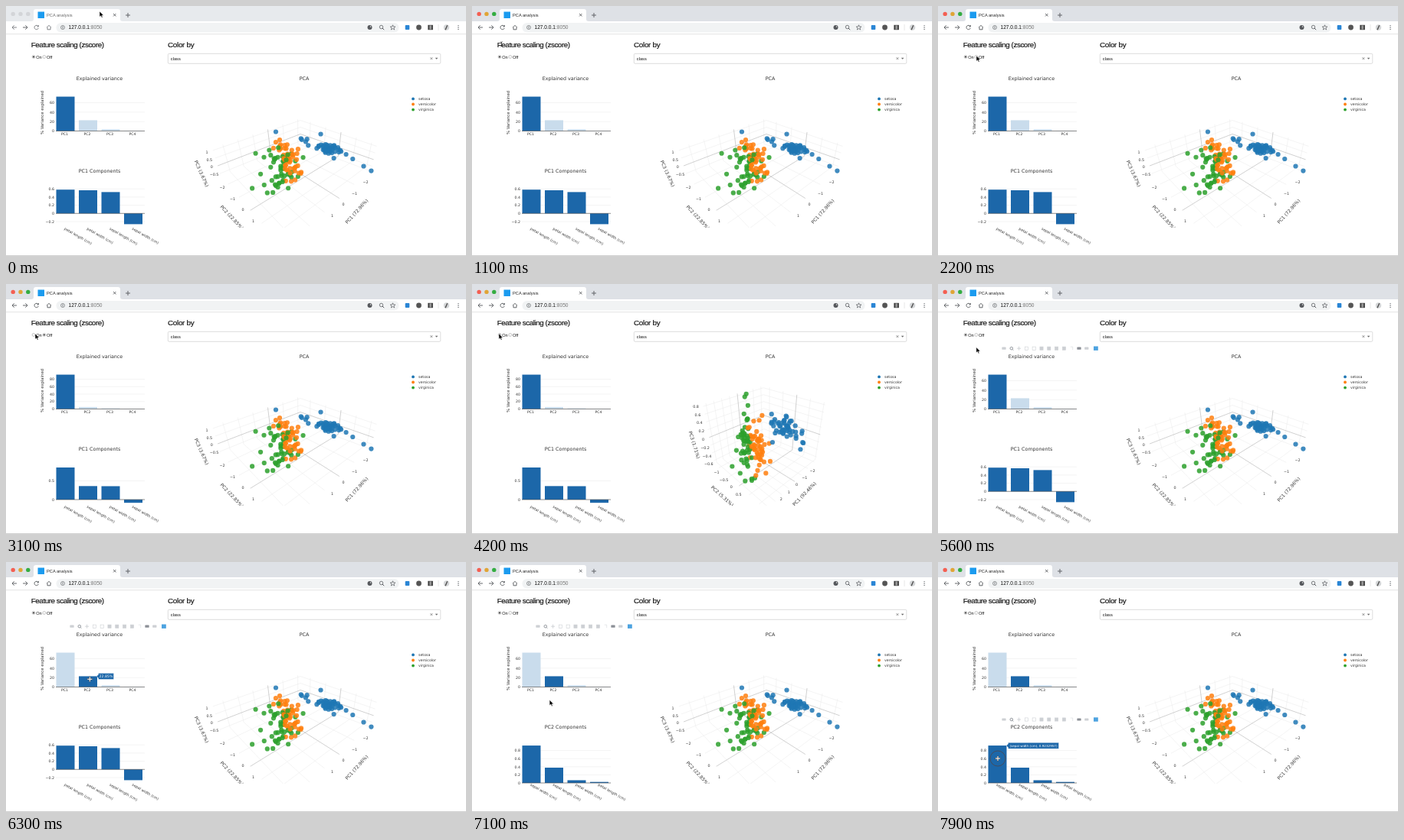
Animation, 600 px wide and 327 px high, one loop 8 s. Source, as an HTML page:

```html
<!DOCTYPE html>
<html lang="en">
<head>
<meta charset="utf-8">
<title>PCA analysis</title>
<style>
html, body { margin: 0; width: 100%; height: 100%; overflow: hidden; background: #fff; }
svg { display: block; width: 600px; height: 327px; }
text { font-family: "DejaVu Sans", Verdana, sans-serif; fill: #333; white-space: pre; }
text.ui { font-family: "Liberation Sans", Arial, sans-serif; fill: #111; }
</style>
</head>
<body>
<svg id="stage" viewBox="0 0 600 327"></svg>
<script>
const LOOP = 8000;
const BAR = '#1c67a9', PALE = '#c9dcec', GRID = '#e9e9e9', INK = '#444', ICON = '#55585c', DIM = '#b4b6b9';
const stage = document.getElementById('stage');

function el(tag, attrs, parent = stage) {
  const node = document.createElementNS('http://www.w3.org/2000/svg', tag);
  for (const key in attrs) node.setAttribute(key, attrs[key]);
  return parent.appendChild(node);
}
const group = (parent = stage, attrs = {}) => el('g', attrs, parent);
const rect = (x, y, width, height, fill, parent, more) => el('rect', { x, y, width, height, fill, ...more }, parent);
const dot = (cx, cy, r, fill, parent, more) => el('circle', { cx, cy, r, fill, ...more }, parent);
const path = (d, stroke, width = 0.5, parent, fill = 'none') =>
  el('path', { d, stroke, fill, 'stroke-width': width }, parent);
const line = (x1, y1, x2, y2, stroke, width, parent) => path(`M${x1} ${y1}L${x2} ${y2}`, stroke, width, parent);
function label(x, y, str, size, parent, more) {
  const node = el('text', { x, y, 'font-size': size, ...more }, parent);
  node.textContent = str;
  return node;
}
const ui = (x, y, str, size, more) => label(x, y, str, size, stage, { class: 'ui', ...more });
const turned = (x, y, str, size, angle, parent, anchor = 'middle') =>
  label(0, 0, str, size, parent, { 'text-anchor': anchor, transform: `translate(${x} ${y}) rotate(${angle})` });
const middle = { 'text-anchor': 'middle' };
const range = (count, make) => Array.from({ length: count }, (_, i) => make(i));

// Browser window
const strip = rect(0, 0, 600, 20, '#dee1e6');
const LIGHTS = ['#f45f52', '#e0a536', '#34ad42'];
const lights = LIGHTS.map((color, i) => dot(9.2 + i * 9.8, 10.4, 2.7, color));
path('M33 20Q36 20 36 17V7Q36 4 39 4H146Q149 4 149 7V17Q149 20 152 20Z', 'none', 0, stage, '#fff');
rect(41.5, 7.5, 8.5, 8.5, '#1b9bef');
const tabTitle = ui(53, 14, 'PCA analysis', 5.7);
path('M140 10l3.4 3.4m0-3.4l-3.4 3.4M156 12h6m-3-3v6', ICON, 0.9);
rect(0, 20, 600, 16.5, '#fff');
rect(65.5, 22, 447, 12.5, '#f1f3f4', stage, { rx: 6.2 });
const navigation = group();
path('M14 28H8m2.7-2.7L8 28l2.7 2.7', 'inherit', 0.9, navigation);
path('M42 26.5a2.7 2.7 0 1 0 .3 2.4M42.4 25v2h-2', 'inherit', 0.9, navigation);
path('M53 28.2l3-2.8 3 2.8M54 28v2.8h4V28', 'inherit', 0.9, navigation);
for (const icon of navigation.children) icon.removeAttribute('stroke');
path('M22 28h6m-2.7-2.7L28 28l-2.7 2.7', ICON, 0.9);
dot(74, 28, 2.5, 'none', stage, { stroke: ICON, 'stroke-width': 0.6 });
line(74, 26.4, 74, 29.5, ICON, 0.7);
const address = ui(81.5, 30.4, '127.0.0.1', 6.6);
el('tspan', { fill: '#777' }, address).textContent = ':8050';
dot(474.5, 28, 3, ICON);
dot(475.5, 27, 0.7, '#fff');
dot(489.5, 27.5, 2.2, 'none', stage, { stroke: ICON, 'stroke-width': 0.8 });
path('M491 29l2.2 2.2', ICON, 1);
path('M504.5 24.8l.9 2.2 2.5.1-2 1.5.8 2.4-2.2-1.4-2.2 1.4.8-2.4-2-1.5 2.5-.1Z', ICON, 0.7);
rect(520.7, 25, 5.6, 6, '#2a86d5', stage, { rx: 1 });
dot(538.5, 28, 3.4, '#555');
rect(550.3, 24.8, 6.6, 6.4, INK);
line(553.6, 25.4, 553.6, 30.6, '#999', 2.6);
line(564, 24, 564, 32, '#ccc');
dot(574.5, 28, 3.7, '#d5d7d9');
path('M573 31.2l2.7-6', '#555', 1.5);
range(3, i => dot(590, 25.6 + i * 2.4, 0.7, ICON));
line(0, 36.7, 600, 36.7, '#d8d8d8', 0.7);
rect(0, 326.3, 600, 0.7, '#bbb');

// Page controls
const heading = { 'letter-spacing': -0.43, stroke: '#111', 'stroke-width': 0.15 };
ui(32.8, 54.3, 'Feature scaling (zscore)', 9.8, heading);
ui(211, 54.3, 'Color by', 9.9, { ...heading, 'letter-spacing': -0.3 });
const radios = ['On', 'Off'].map((name, i) => {
  const x = 36 + i * 13.8;
  dot(x, 66.5, 1.9, '#fff', stage, { stroke: '#888', 'stroke-width': 0.5 });
  ui(x + 3.2, 68.5, name, 5.6);
  return dot(x, 66.5, 1.1, '#333');
});
rect(211.3, 62.3, 355.5, 13, '#fff', stage, { rx: 1.5, stroke: '#c4c4c4', 'stroke-width': 0.6 });
ui(214.8, 70.7, 'class', 5.7);
path('M553.5 67.2l2.8 2.8m0-2.8l-2.8 2.8', '#666', 0.7);
path('M559.8 67.7h3.6l-1.8 2Z', 'none', 0, stage, '#666');

// Bar charts
const slot = i => 77.5 + i * 29.5;
function barChart({ zero, unit, step, from = 0, to, values, names, chosen, tilt }) {
  const g = group();
  for (let tick = from; tick < to + step / 2; tick += step) {
    const y = zero - tick * unit;
    line(65, y, 181, y, GRID, 0.5, g);
    label(63, y + 1.7, String(+tick.toFixed(1)).replace('-', '−'), 4.7, g, { 'text-anchor': 'end' });
  }
  values.forEach((v, i) => {
    const h = Math.abs(v) * unit;
    rect(slot(i) - 12, v > 0 ? zero - h : zero, 24, h, tilt || i === chosen ? BAR : PALE, g);
    if (tilt) turned(slot(i) - 1.9, 292.2, names[i], 4.7, 30, g, 'start');
    else label(slot(i) - 1, 168.7, names[i], 4.7, g, middle);
  });
  line(65, zero, 181, zero, INK, 0.6, g);
  return g;
}
label(122, 97.3, 'Explained variance', 6.35, stage, middle);
turned(48.7, 139.5, '% Variance explained', 5.3, -90, stage);
const componentTitle = label(122, 218.3, '', 6.35, stage, middle);

const scaled = {
  zero: 163.5, unit: 0.616, step: 20, to: 60, chosen: 0,
  values: [72.96, 22.85, 3.67, 0.52], names: range(4, i => 'PC' + (i + 1))
};
const varianceViews = {
  on: barChart(scaled),
  off: barChart({ ...scaled, unit: 0.486, to: 80, values: [92.46, 5.31, 1.71, 0.52] }),
  second: barChart({ ...scaled, chosen: 1 })
};
const components = (zero, unit, step, from, to, values, names) => barChart({
  zero, unit, step, from, to, values, tilt: true, names: names.split(',').map(name => name + ' (cm)')
});
const componentViews = {
  on: components(271.3, 53.5, 0.2, -0.2, 0.6, [0.581, 0.566, 0.522, -0.263],
    'petal length,petal width,sepal length,sepal width'),
  off: components(282, 49, 0.5, 0, 0.5, [0.857, 0.361, 0.358, -0.085],
    'petal length,sepal length,petal width,sepal width'),
  second: components(289, 53, 0.2, 0, 0.8, [0.923, 0.377, 0.067, 0.025],
    'sepal width,sepal length,petal width,petal length')
};

// 3D scatter
const SPECIES = { setosa: '#1f77b4', versicolor: '#ff7f0e', virginica: '#2ca02c' };
label(389, 97.3, 'PCA', 6.35, stage, middle);
Object.entries(SPECIES).forEach(([name, color], i) => {
  dot(531, 121.4 + i * 7.1, 1.9, color);
  label(538, 123.1 + i * 7.1, name, 4.7);
});
rect(205, 100, 310, 190, '#000', el('clipPath', { id: 'scene' }));

function randomizer(seed) {
  return () => {
    seed = (seed * 1664525 + 1013904223) % 4294967296;
    return seed / 4294967296;
  };
}
const mix = (a, b, f) => [a[0] + (b[0] - a[0]) * f, a[1] + (b[1] - a[1]) * f];

// Axes run from the back corner to the left (pc1) and right (pc2), and upwards (pc3).
function scatter({ seed, floor, top, pc1, pc2, pc3, titles, clusters }) {
  const g = group(stage, { 'clip-path': 'url(#scene)' });
  const [left, back, right, front] = floor;
  const [leftTop, backTop, rightTop] = top;
  const rules = {
    pc1: f => [mix(backTop, leftTop, f), mix(back, left, f), mix(right, front, f)],
    pc2: f => [mix(backTop, rightTop, f), mix(back, right, f), mix(left, front, f * 0.88)],
    pc3: f => [mix(left, leftTop, f), mix(back, backTop, f), mix(right, rightTop, f)]
  };
  const axes = { pc1, pc2, pc3 };
  for (const zeroLines of [false, true])
    for (const key in axes) {
      const { start, gap, count, zero } = axes[key];
      for (let i = 0; i < count; i++)
        if ((i === zero) === zeroLines)
          path('M' + rules[key](start + gap * i).join('L'), zeroLines ? '#a3a3a3' : GRID, 0.5, g);
    }
  for (const { ticks, first, shift } of Object.values(axes))
    ticks.split(' ').forEach((tick, i) =>
      label(first[0] + shift[0] * i, first[1] + shift[1] * i + 1.8, tick, 4.8, g, middle));
  for (const [x, y, angle, name] of titles) turned(x, y, name, 6, angle, g);

  const random = randomizer(seed);
  const bell = () => (random() + random() + random() + random() - 2) * 1.75;
  for (let n = 0; n < 50; n++)
    Object.values(SPECIES).forEach((color, i) => {
      const { center, spread, lean = 0 } = clusters[i];
      const u = bell(), reach = 0.5 + random();
      dot(center[0] + u * reach * spread[0], center[1] + u * reach * lean + bell() * reach * spread[1],
        3.1, color, g, { 'fill-opacity': 0.85 });
    });
  return g;
}

const scatterViews = {
  on: scatter({
    seed: 7,
    floor: [[280, 222], [384, 179], [477, 212], [363, 319]],
    top: [[269, 186], [384, 147], [484, 181]],
    pc1: { start: 0.03, gap: 0.17, count: 6, zero: 2, ticks: '−2 −1 0 1', first: [469, 230.5], shift: [-14.5, 14.5] },
    pc2: { start: 0.13, gap: 0.2, count: 5, zero: 2, ticks: '−2 −1 0 1', first: [282, 237], shift: [13.5, 14.8] },
    pc3: { start: 0.08, gap: 0.28, count: 4, zero: 1, ticks: '1 0.5 0 −0.5', first: [262, 191], shift: [3.2, 9.7] },
    titles: [[253, 220, 66, 'PC3 (3.67%)'], [293, 278, 47, 'PC2 (22.85%)'], [459, 270, -48, 'PC1 (72.96%)']],
    clusters: [
      { center: [421, 187], spread: [19, 5], lean: 6 },
      { center: [369, 199], spread: [9, 14], lean: 3 },
      { center: [357, 217], spread: [13, 18], lean: 3 }
    ]
  }),
  off: scatter({
    seed: 21,
    floor: [[316, 235], [381, 202], [449, 230], [384, 296]],
    top: [[301, 157], [380, 133], [461, 155]],
    pc1: { start: 0.04, gap: 0.13, count: 8, zero: 3, ticks: '−2 −1 0 1 2', first: [444, 244], shift: [-10.2, 9.3] },
    pc2: { start: 0.1, gap: 0.22, count: 5, zero: 2, ticks: '−1 −0.5 0 0.5', first: [319, 246], shift: [9.6, 9.7] },
    pc3: { start: 0.05, gap: 0.13, count: 8, zero: 3, ticks: '0.8 0.6 0.4 0.2 0 −0.2 −0.4 −0.6', first: [292, 160], shift: [2.4, 10.8] },
    titles: [[288, 211, 73, 'PC3 (1.71%)'], [325, 279, 42, 'PC2 (5.31%)'], [435, 276, -46, 'PC1 (92.46%)']],
    clusters: [
      { center: [408, 189], spread: [12, 8], lean: 4 },
      { center: [372, 208], spread: [6, 16], lean: 4 },
      { center: [358, 212], spread: [6, 22], lean: 3 }
    ]
  })
};

// Chart toolbars and hover labels
function toolbar(y) {
  const g = group();
  for (let i = 0; i < 12; i++) {
    const x = 86 + i * 9.8, color = i === 1 || i === 10 ? '#8b8f96' : '#cdd0d4';
    if (i === 1) {
      dot(x, y, 1.8, 'none', g, { stroke: color, 'stroke-width': 0.9 });
      line(x + 1.2, y + 1.2, x + 2.5, y + 2.5, color, 0.9, g);
    } else if (i === 2) path(`M${x - 2.5} ${y}h5m-2.5-2.5v5`, color, 0.9, g);
    else if (i === 9) path(`M${x - 1.5} ${y - 2}h3v4`, color, 0.5, g);
    else if (i > 9 || !i) rect(x - 2.6, y - 1.6, 5.2, 3.2, color, g, { rx: 0.6 });
    else rect(x - 2.1, y - 2.1, 4.2, 4.2, i > 4 ? color : 'none', g, { stroke: color, 'stroke-width': 0.6 });
  }
  rect(203, y - 2.7, 5.8, 5.4, '#4da3e0', g);
  return g;
}
function hoverTag(x, y, width, str, size) {
  const g = group();
  path(`M${x - 2.5} ${y}l2.5-2.3v-1.7h${width}v8h${-width}v-1.7Z`, '#fff', 0.4, g, BAR);
  label(x + width / 2, y + 1.7, str, size, g, { ...middle, style: 'fill:#fff' });
  return g;
}
const varianceBar = toolbar(84.2), componentBar = toolbar(206);
const varianceTag = hoverTag(120.5, 149.5, 20, '22.85%', 4.7);
const componentTag = hoverTag(91.5, 240.3, 66, '(sepal width (cm), 0.9232957)', 4.1);

// Pointer
const pointer = group();
const arrow = path('M0 0V7.2L1.7 5.7 2.9 8.3 4.1 7.8 3 5.3H5.3Z', '#fff', 0.5, pointer, '#000');
const beam = path('M-1.3-3.2Q0-3.2 0-2.2 0-3.2 1.3-3.2M0-2.2V2.2M-1.3 3.2Q0 3.2 0 2.2 0 3.2 1.3 3.2', '#222', 0.7, pointer);
const cross = group(pointer);
path('M-3.5 0h7M0-3.5v7', '#555', 2, cross);
path('M-3 0h6M0-3v6', '#fff', 1, cross);
const ring = dot(0, 0, 10, 'none', pointer, { stroke: '#4a4a55', 'stroke-width': 0.9 });

const moves = [
  { from: 400, to: 1000, spot: [38.5, 50] },
  { from: 1300, to: 2000, spot: [50, 65] },
  { from: 2500, to: 3000, spot: [38, 65] },
  { from: 3500, to: 3800, spot: [35, 65] },
  { from: 5400, to: 6100, spot: [109.3, 153.3] },
  { from: 6900, to: 7500, spot: [78, 257] }
];
function pointerAt(t) {
  return moves.reduce((place, { from, to, spot }) => {
    const f = Math.min(1, Math.max(0, (t - from) / (to - from)));
    return mix(place, spot, f * f * (3 - 2 * f));
  }, [122, 7]);
}

const show = (node, on) => node.setAttribute('display', on ? 'inline' : 'none');
const pick = (views, name) => { for (const key in views) show(views[key], key === name); };

function render(t) {
  const within = (a, b) => t >= a && t < b;
  const focused = t >= 400;
  strip.setAttribute('fill', focused ? '#dee1e6' : '#e7eaed');
  lights.forEach((light, i) => light.setAttribute('fill', focused ? LIGHTS[i] : '#d3d5d8'));
  navigation.setAttribute('stroke', focused ? ICON : '#777a7e');
  tabTitle.style.fill = focused ? '#222' : '#666';
  const busy = within(2400, 2900) || within(4300, 4900) || within(6400, 6800);
  tabTitle.textContent = busy ? 'Updating...' : 'PCA analysis';

  const off = within(2300, 3800), barsOff = within(2900, 4600), second = t >= 6700;
  show(radios[0], !off);
  show(radios[1], off);
  pick(varianceViews, barsOff ? 'off' : t >= 6200 ? 'second' : 'on');
  pick(componentViews, barsOff ? 'off' : second ? 'second' : 'on');
  pick(scatterViews, within(3200, 4700) ? 'off' : 'on');
  componentTitle.textContent = second ? 'PC2 Components' : 'PC1 Components';

  const [x, y] = pointerAt(t);
  const overVariance = y > 110 && y < 164, overComponents = y > 236;
  const text = within(900, 1500);
  show(varianceBar, y > 80 && y < 185);
  show(componentBar, y >= 200);
  show(varianceTag, overVariance && x > 95);
  show(componentTag, overComponents);
  pointer.setAttribute('transform', `translate(${x} ${y})`);
  show(beam, text);
  show(cross, overVariance || overComponents);
  show(arrow, !text && !overVariance && !overComponents);
  show(ring, t >= 7800);
}

const start = performance.now();
function tick() {
  render((performance.now() - start) % LOOP);
  requestAnimationFrame(tick);
}
tick();
</script>
</body>
</html>
```
